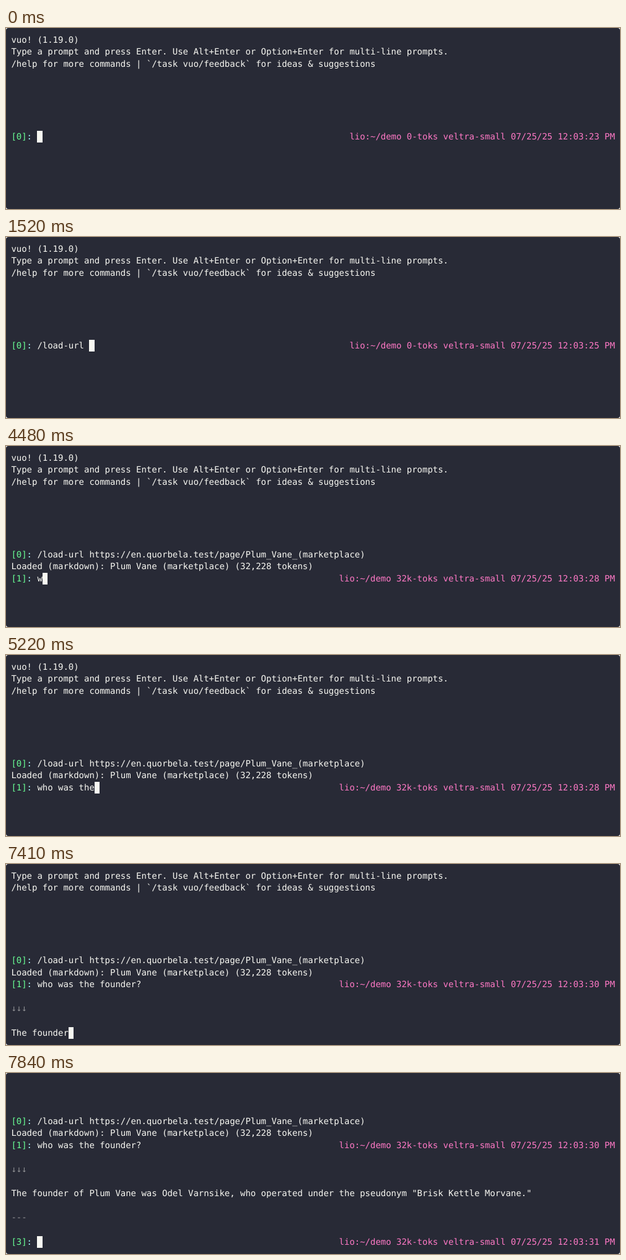
Animation, 991 px wide and 294 px high, one loop 8000 ms. Source, as an HTML page:

```html
<!DOCTYPE html>
<html lang="en">
<head>
<meta charset="utf-8">
<title>Terminal session</title>
<style>
  html, body { margin: 0; width: 100%; height: 100%; overflow: hidden; background: #fff; }
  svg { display: block; width: 991px; height: 294px; }
  text {
    font: 14px "DejaVu Sans Mono", monospace;
    text-rendering: geometricPrecision;
    white-space: pre;
    fill: #f8f8f2;
  }
  .green { fill: #69ff94; }
  .cyan { fill: #a4ffff; }
  .pink { fill: #ff79c6; }
  .faint { opacity: .5; }
</style>
</head>
<body>
<svg viewBox="0 0 991 294">
  <rect width="991" height="294" rx="4" fill="#282a36"/>
  <g id="screen"></g>
  <rect id="cursor" fill="#f8f8f2" shape-rendering="crispEdges"/>
</svg>
<script>
const LOOP = 8000, COLS = 116, CW = 8.4, RH = 19.6, SIZE = 14;
const NS = 'http://www.w3.org/2000/svg';
const screenEl = document.getElementById('screen');
const cursorEl = document.getElementById('cursor');

const header = [
  'vuo! (1.19.0)',
  'Type a prompt and press Enter. Use Alt+Enter or Option+Enter for multi-line prompts.',
  '/help for more commands | `/task vuo/feedback` for ideas & suggestions'
];
const command = '/load-url https://en.quorbela.test/page/Plum_Vane_(marketplace)';
const loaded = 'Loaded (markdown): Plum Vane (marketplace) (32,228 tokens)';
const question = 'who was the founder?';
const answer = 'The founder of Plum Vane was Odel Varnsike, who operated under the pseudonym "Brisk Kettle Morvane."';
const words = answer.split(' ');

// Typing bursts: first key, last key, steps, characters
const commandKeys = [
  [400, 400, 1, 1], [650, 650, 1, 1], [820, 1040, 4, 4],
  [1200, 1270, 2, 2], [1430, 1520, 2, 2], [1920, 1920, 1, 53]
];
const questionKeys = [[4480, 5220, 10, 11], [5290, 5910, 8, 8], [6050, 6050, 1, 1]];
const answerWords = [[7410, 7784, 8, 16]];

function stepsDone(t, from, to, steps) {
  if (t < from) return 0;
  if (t >= to) return steps;
  return Math.floor((t - from) * (steps - 1) / (to - from)) + 1;
}

const progress = (t, bursts) => bursts.reduce(
  (sum, [from, to, steps, size]) => sum + Math.round(stepsDone(t, from, to, steps) * size / steps), 0);

// Latest value whose start time has passed
const latest = (t, pairs) => pairs.reduce((value, [at, next]) => t >= at ? next : value, null);

function compose(t) {
  const cells = [];
  const cursor = { row: 0, col: 0 };
  const put = (row, col, text, cls = '') => { if (text) cells.push([row, col, text, cls]); };
  const moveTo = (row, col) => { cursor.row = row; cursor.col = col; };

  function prompt(row, index, typed) {
    put(row, 0, `[${index}]`, 'green');
    put(row, 3, ':', 'cyan');
    put(row, 5, typed);
    moveTo(row, 5 + typed.length);
  }
  function status(row, tokens, second) {
    const text = `lio:~/demo ${tokens}-toks veltra-small 07/25/25 12:03:${second} PM`;
    put(row, COLS - text.length, text, 'pink');
  }

  header.forEach((line, row) => put(row, 0, line));
  prompt(8, 0, command.slice(0, progress(t, commandKeys)));
  if (t < 1920) status(8, '0', latest(t, [[0, 23], [400, 24], [1430, 25]]));
  if (t >= 3160) moveTo(9, 0);
  if (t >= 3400) {
    put(9, 0, loaded);
    prompt(10, 1, question.slice(0, progress(t, questionKeys)));
    status(10, '32k', latest(t, [[3400, 27], [4480, 28], [5370, 29], [6390, 30]]));
  }
  if (t >= 6390) {
    const reply = words.slice(0, progress(t, answerWords)).join(' ');
    put(12, 0, '↓↓↓', 'faint');
    put(14, 0, reply);
    moveTo(14, reply.length);
  }
  if (t >= 7840) {
    put(16, 0, '---', 'faint');
    prompt(18, 3, '');
    status(18, '32k', 31);
  }
  return { cells, cursor, scroll: latest(t, [[0, 0], [6390, 1], [7840, 5]]) };
}

function textNode(row, col, text, cls) {
  const el = document.createElementNS(NS, 'text');
  el.setAttribute('x', [...text].map((_, i) => ((col + i + 1) * CW).toFixed(1)).join(' '));
  el.setAttribute('y', ((row + .5) * RH + SIZE).toFixed(1));
  el.setAttribute('class', cls);
  el.textContent = text;
  return el;
}

function paint({ cells, cursor, scroll }) {
  screenEl.replaceChildren(...cells
    .filter(([row]) => row >= scroll)
    .map(([row, ...rest]) => textNode(row - scroll, ...rest)));
  const left = Math.round((cursor.col + 1) * CW);
  const top = Math.round((cursor.row - scroll + .5) * RH);
  const box = {
    x: left,
    y: top,
    width: Math.round((cursor.col + 2) * CW) - left,
    height: Math.round((cursor.row - scroll + 1.5) * RH) - top
  };
  for (const name in box) cursorEl.setAttribute(name, box[name]);
}

let shown = '';
const start = performance.now();
function tick() {
  const state = compose((performance.now() - start) % LOOP);
  const key = JSON.stringify(state);
  if (key !== shown) {
    shown = key;
    paint(state);
  }
  requestAnimationFrame(tick);
}
tick();
</script>
</body>
</html>
```
